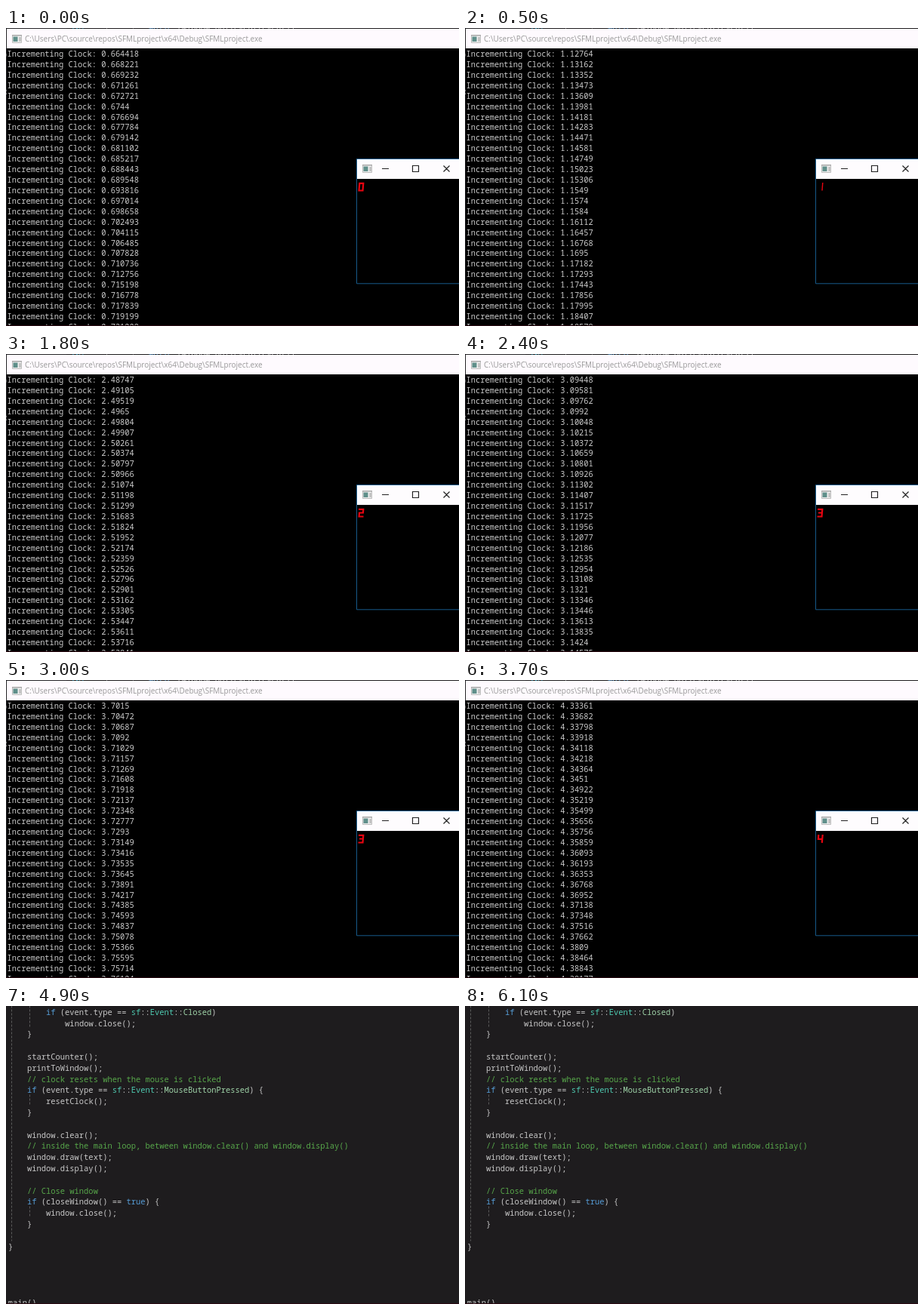
Write an HTML page that moves like this. It is 600x395 px and loops after 6.2 s.

```html
<!DOCTYPE html>
<html>
<head>
<meta charset="utf-8">
<style>
  html, body { margin: 0; width: 100%; height: 100%; overflow: hidden; background: #1e1c1e; }
  svg { display: block; }
  text { white-space: pre; }
  #code text, #rows text { font-family: "Noto Sans Mono", monospace; }
  #code text { font-size: 10.45px; fill: #c8c8c8; }
  #rows text { font-size: 10.4px; fill: #cccccc; }
  #panel text { font: 10px "Open Sans", sans-serif; fill: #f1f1f1; text-anchor: end; }
  #title { font: 9.97px "Open Sans", sans-serif; }
  #code .keyword { fill: #569cd6; }
  #code .comment { fill: #57a64a; }
  #code .type { fill: #4ec9b0; }
  #code .member { fill: #9fd3a8; }
  #code .number { fill: #2b91af; }
  .guide { stroke: #5a5a5a; stroke-dasharray: 3 2; }
</style>
</head>
<body>
<svg width="600" height="395" viewBox="0 0 600 395">
  <defs>
    <g id="icon">
      <path fill="#f0f0f0" stroke="#bdbdbd" d="M.5 .5h12v10h-12z"/>
      <path fill="#a8a8a8" d="M0 0h13v1.500H0z"/>
      <path fill="#5f8f8a" d="M1.500 2.500h6v6.500h-6z"/>
      <path fill="#b5b5b5" d="M9.500 3h2v6h-2z"/>
    </g>
  </defs>
  <rect width="600" height="395" fill="#1e1c1e"/>

  <g id="editor">
    <g id="panel">
      <path fill="#252528" d="M0 0h80v420H0z"/>
      <text x="47" y="38.500">(1 project)</text>
      <text x="32" y="87.500">Dependencies</text>
      <path fill="none" stroke="#fff" stroke-width="1.700" d="M32 16l-3 3M32 13a3 3 0 1 0 6 0a3 3 0 1 0-6 0"/>
      <path fill="#fff" d="M43 12h5l-2.500 3z"/>
    </g>
    <path stroke="#777" d="M133.500 0V420"/>
    <path fill="#1e1c1e" stroke="#999" d="M130 276h7v7h-7z"/>
    <path class="guide" d="M168.500 0V332M192.500 20V50M192.500 138V152M192.500 286V301"/>
    <g id="code"></g>
  </g>

  <g id="console">
    <path d="M1 1H620V410H1z"/>
    <path fill="#fefafe" d="M1 1H620V27H1z"/>
    <use href="#icon" x="8" y="9"/>
    <text id="title" x="25" y="18">C:\Users\PC\source\repos\SFMLproject\x64\Debug\SFMLproject.exe</text>
    <g id="rows"></g>
  </g>

  <g id="app">
    <path stroke="#175a8a" d="M464.500 173.500H620V338.800H464.500z"/>
    <path fill="#fefcfe" d="M465 174H620V200H465z"/>
    <use href="#icon" x="472" y="181"/>
    <path fill="none" stroke="#222" stroke-width="1.200" d="M498 186.500h9M538.500 182.500h8v8h-8zM579.500 182.500l8 8m0-8l-8 8"/>
    <path id="digit" fill="none" stroke="#e80410"/>
  </g>
  <path fill="#2a0a12" d="M0 394h600v1H0z"/>
</svg>
<script>
const LOOP = 6200, STEP = 100, CLOSE = 4300, RELAYOUT = 4800;
const $ = id => document.getElementById(id);

const source = `        while (window.pollEvent(event))
        {
            if (event.type == sf::Event::Closed)
                window.close();
        }

        startCounter();
        printToWindow();
        // clock resets when the mouse is clicked
        if (event.type == sf::Event::MouseButtonPressed) {
            resetClock();
        }

        window.clear();
        // inside the main loop, between window.clear() and window.display()
        window.draw(text);
        window.display();

        // Close window
        if (closeWindow() == true) {
            window.close();
        }

    }




int main()`.split("\n");

function highlight(line) {
  const rules = /(\/\/.*)|\b(while|if|true|int)\b|\b(sf|Event)\b|\b(Closed|MouseButtonPressed)\b/g;
  return line.replace(rules, (word, comment, keyword, type) => {
    const kind = comment ? "comment" : keyword ? "keyword" : type ? "type" : "member";
    return `<tspan class="${kind}">${word}</tspan>`;
  });
}

$("code").innerHTML = source.map((line, i) => {
  const y = 2.7 + 14.8 * i;
  const indent = line.search(/\S|$/);
  return `<text class="number" x="86" y="${y}">${201 + i}</text>` +
    `<text x="${138.8 + indent * 6.27}" y="${y}">${highlight(line.trim())}</text>`;
}).join("");

const rows = Array.from({ length: 27 }, (_, i) => {
  const row = document.createElementNS("http://www.w3.org/2000/svg", "text");
  row.setAttribute("x", 1.5);
  row.setAttribute("y", 38 + 13.92 * i);
  return $("rows").appendChild(row);
});

// Clock reading on the top console row: [ms, seconds]
const readings = [[0, .664418], [1000, 1.59087], [1800, 2.48747], [3000, 3.7015], [3700, 4.33361], [4400, 4.94079], [5200, 5.7]];

function clockAt(t) {
  const i = readings.findIndex(([time]) => time > t);
  const [t0, v0] = readings[i - 1], [t1, v1] = readings[i];
  return v0 + (v1 - v0) * (t - t0) / (t1 - t0);
}

function noise(n) {
  const x = Math.sin(n * 12.9898) * 43758.5453;
  return x - Math.floor(x);
}

// Slanted segment digits
const digits = [
  "M468.300 205.800H473.300L472.500 215.500H467.500Z",
  "M473.800 205L473 215.500",
  "M467 205.800H473.300L472.900 210.500H468L467.600 215.500H473.500",
  "M467 205.800H473.300L472.500 215.500H466.500M468 210.500H473",
  "M468.300 205L467.900 210.800H473.500M473.700 205L472.800 215.800"
];

function draw(t) {
  const closing = Math.max(0, t - CLOSE);
  const open = closing < 260;
  $("console").style.display = $("app").style.display = open ? "" : "none";
  $("editor").setAttribute("transform", t < RELAYOUT ? "" : "translate(-161 -20.5)");
  if (!open) return;

  let value = clockAt(t);
  rows.forEach((row, i) => {
    row.textContent = "Incrementing Clock: " + Number(value.toPrecision(6));
    value += .001 + .0033 * noise(t / STEP * 31 + i + 1) ** 2;
  });
  const digit = Math.min(4, Math.floor(value));
  $("digit").setAttribute("d", digits[digit]);
  $("digit").setAttribute("stroke-width", digit === 1 ? 1.4 : 2.2);

  const shrink = closing / 100;
  $("console").setAttribute("opacity", 1 - closing / 260);
  $("console").setAttribute("transform", `translate(${7 * shrink} ${4 * shrink}) scale(${1 - .017 * shrink})`);
  $("title").setAttribute("fill", closing ? "#111" : "#999");
  $("app").setAttribute("opacity", Math.max(0, 1 - closing / 110));
  $("app").setAttribute("transform", `translate(${4 * shrink} ${3 * shrink})`);
}

let last = -1;
function tick() {
  const t = Math.floor(performance.now() % LOOP / STEP) * STEP;
  if (t !== last) draw(last = t);
  requestAnimationFrame(tick);
}
tick();
</script>
</body>
</html>
```
